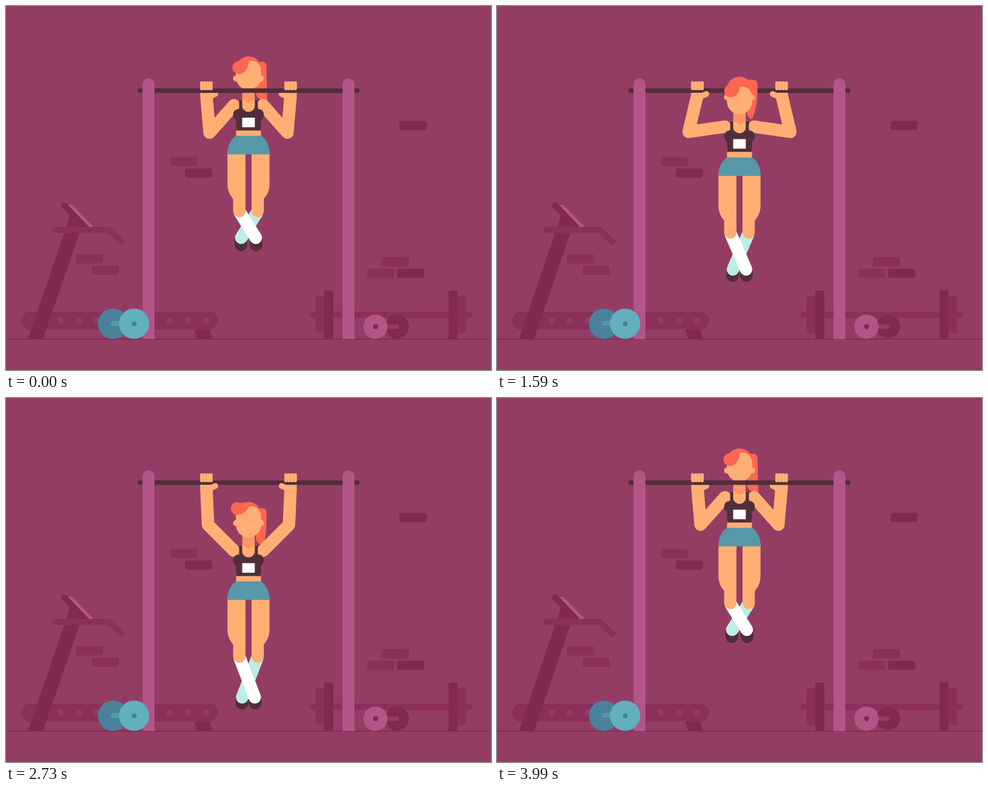
An HTML page with a canvas that plays this animation: 800x600 px, repeating every 4.02 s.

```html
<!DOCTYPE html>
<html lang="en">
<head>
<meta charset="utf-8">
<title>Pull-ups</title>
<style>
html, body { margin: 0; width: 100%; height: 100%; overflow: hidden; background: #933d64; }
canvas { display: block; width: 800px; height: 600px; }
</style>
</head>
<body>
<canvas id="stage" width="800" height="600"></canvas>
<script>
const ctx = document.getElementById('stage').getContext('2d');
const LOOP = 4020;
const C = {
  wall: '#933d64', mid: '#8b3058', dark: '#812950', pink: '#b45587',
  iron: '#502e3a', skin: '#ffaf73', shade: '#ff9566', hair: '#fd6750',
  shorts: '#5798a8', sock: '#ffffff', sockBack: '#bdede7',
  blue: '#4a819c', teal: '#62afbe'
};

// ---------- helpers ----------
function rect(x, y, w, h, color, r = 0) {
  ctx.fillStyle = color;
  ctx.beginPath();
  ctx.roundRect(x, y, w, h, r);
  ctx.fill();
}
function disc(x, y, r, color) {
  ctx.fillStyle = color;
  ctx.beginPath();
  ctx.arc(x, y, r, 0, Math.PI * 2);
  ctx.fill();
}
function line(points, width, color, cap = 'round') {
  ctx.strokeStyle = color;
  ctx.lineWidth = width;
  ctx.lineCap = cap;
  ctx.lineJoin = 'round';
  ctx.beginPath();
  points.forEach(([x, y]) => ctx.lineTo(x, y));
  ctx.stroke();
}
function shape(d, color) {
  ctx.fillStyle = color;
  ctx.fill(new Path2D(d));
}
function mirrored(draw) {
  draw();
  ctx.save();
  ctx.translate(800, 0);
  ctx.scale(-1, 1);
  draw();
  ctx.restore();
}
const mix = (a, b, k) => a + (b - a) * k;
function ease(t, from, to) {
  const k = Math.min(1, Math.max(0, (t - from) / (to - from)));
  return k * k * (3 - 2 * k);
}
function bump(t, from, to) {
  return t > from && t < to ? Math.sin(Math.PI * (t - from) / (to - from)) : 0;
}
// Eased track through [time, value] keys
function track(t, keys) {
  let v = keys[0][1];
  for (let i = 1; i < keys.length; i++) {
    v += (keys[i][1] - keys[i - 1][1]) * ease(t, keys[i - 1][0], keys[i][0]);
  }
  return v;
}

// ---------- motion ----------
const DROP = [[0, 0], [900, 96], [1112, 96], [1832, 14], [2002, 14], [2902, 96], [3098, 96], [3815, 0]];
const STRETCH = [[430, 0], [850, 1], [1300, 1], [1950, 0], [2432, 0], [2852, 1], [3150, 1], [3680, 0]];
const TAIL = [[0, 431], [510, 428], [800, 428], [1140, 421], [1620, 421], [2000, 431], [2070, 431],
  [2730, 426], [3100, 421], [3510, 421], [3900, 431]];

const UP =    { chin: 138,   ear: 119.5, top: 83, brow: 90,   fx: 384,   fy: 101.5, tail: 92,   end: 155 };
const LEVEL = { chin: 141.5, ear: 118,   top: 83, brow: 90.5, fx: 381.5, fy: 94,    tail: 93.5, end: 154.5 };
const DOWN =  { chin: 143,   ear: 115,   top: 81, brow: 98,   fx: 385.5, fy: 105,   tail: 86,   end: 151 };

function headPose(t) {
  const up = 1 - ease(t, 0, 400) + ease(t, 3550, 3820);
  const down = ease(t, 1200, 1650) - ease(t, 2070, 2300);
  const lift = 4.5 * bump(t, 1640, 2070) + 5 * bump(t, 3620, 3990);
  const p = {};
  for (const k in UP) {
    p[k] = LEVEL[k] + (UP[k] - LEVEL[k]) * up + (DOWN[k] - LEVEL[k]) * down;
    if (k !== 'fx') p[k] -= lift;
  }
  p.top += 1.5 * bump(t, 300, 760);
  p.tip = track(t, TAIL);
  return p;
}

// ---------- room ----------
function bricks() {
  [[649, 189.5, 1], [271, 248.5, 0], [295, 267.8, 1], [115.5, 409, 0], [141, 428, 0],
   [620, 414, 0], [595.5, 433, 0], [645, 433, 1]]
    .forEach(([x, y, d]) => rect(x, y, 44.8, 15.3, d ? C.dark : C.mid, 4));
}
function treadmill() {
  shape('M310 532H335L340 549H315Z', C.dark);
  rect(25, 504, 325, 29.2, C.mid, 14.6);
  [90, 120, 150, 270, 300, 330].forEach(x => disc(x, 518.6, 5.4, C.wall));
  shape('M99.5 364H124.5L61 549H36Z', C.dark);
  line([[96, 329], [131, 364]], 10, C.dark, 'round');
  shape('M107 339L137 364H100Z', C.dark);
  rect(120, 364, 22, 8, C.wall);
  shape('M99.5 364H124.5L121 374H96Z', C.dark);
  shape('M103 328H109.5L144.5 364H137Z', C.pink);
  line([[81, 369], [170, 369], [190.5, 389]], 10, C.mid);
}
function barbell() {
  line([[505.5, 509], [764.5, 509]], 10, C.mid);
  rect(510.5, 478, 15, 61, C.mid);
  rect(744, 478, 15, 61, C.mid);
  rect(525, 469, 15, 80, C.dark);
  rect(730, 469, 14.5, 80, C.dark);
}
function dumbbells() {
  disc(645, 528.5, 19.7, C.dark);
  line([[625, 528.5], [644.5, 528.5]], 7.5, C.wall);
  disc(609.5, 528.5, 20, C.pink);
  disc(609.5, 528.5, 4.2, C.dark);
  disc(176.5, 523.7, 25, C.blue);
  line([[177, 523.3], [195, 523.3]], 8, C.shorts);
  disc(211.3, 523.7, 25, C.teal);
  disc(211.3, 523.7, 4.2, C.blue);
}
function room() {
  rect(0, 0, 800, 600, C.wall);
  bricks();
  treadmill();
  barbell();
  rect(0, 548.5, 800, 1, '#772348');
}
function posts() {
  mirrored(() => rect(225.3, 119, 19.6, 430, C.pink, [9.8, 9.8, 0, 0]));
}
function bar() {
  line([[220.5, 139.5], [579.5, 139.5]], 7.6, C.iron);
}

// ---------- athlete ----------
function arms(drop) {
  const hx = 330.5, hy = 145, sx = 376, sy = 163.5 + drop;
  const fore = 64, upper = 60.5;
  const dx = sx - hx, dy = sy - hy, dist = Math.hypot(dx, dy);
  const along = (fore * fore - upper * upper + dist * dist) / (2 * dist);
  const out = Math.sqrt(Math.max(0, fore * fore - along * along));
  const ex = hx + (dx * along - dy * out) / dist;
  const ey = hy + (dy * along + dx * out) / dist;
  mirrored(() => {
    rect(320.2, 143, 20.6, 13, C.skin, [0, 0, 10.3, 10.3]);
    line([[hx, hy + 2], [ex, ey], [sx, sy]], 20.6, C.skin, 'butt');
    disc(sx, sy, 10.3, C.skin);
    line([[337, 148.7], [345.3, 145]], 9.5, C.skin);
  });
}
function fists() {
  mirrored(() => {
    rect(320.2, 125.5, 20.8, 12, C.skin, 4);
    for (let i = 0; i < 4; i++) rect(320.2 + i * 5.1, 124, 5.5, 15, C.skin, 2.7);
  });
}
function legs(k) {
  const foot = 382 + 29 * k, fx = 412 - 2 * k;
  const heel = 393.4 + 26.5 * k, hx = 412.5 - 2 * k;
  const shoe = x => line([[x, heel - 8 + 4 * k], [x, heel]], 21, C.iron);
  const sock = (from, to, color) => {
    line([[from, 339], [to, foot]], 20.5, color, 'butt');
    disc(to, foot, 10.25, color);
  };
  shoe(800 - hx);
  shoe(hx);
  sock(415, 800 - fx, C.sockBack);
  sock(385, fx, C.sock);
  mirrored(() => shape('M365.3 240H395V339A10.2 10.2 0 0 1 374.7 339V318C369 311 365.3 304 365.3 293Z', C.skin));
  shape('M380 213.5H420C429 219 434.8 230 434.8 244.6H365.2C365.2 230 371 219 380 213.5Z', C.shorts);
}
function torso() {
  rect(379.5, 200, 41, 14, C.skin);
  disc(400, 209, 1.1, C.shade);
  rect(385, 154, 30, 24, C.skin);
  mirrored(() => {
    disc(384.3, 179.3, 9.8, C.iron);
    rect(384.6, 154.3, 5, 24, C.iron);
  });
  shape('M379.5 174H389.5V164A10.5 10.5 0 0 0 410.5 164V174H420.5V205.2H379.5Z', C.iron);
  rect(389.6, 184, 20.8, 15.8, C.sock);
}
function tail(p) {
  const { tail: y, end, tip } = p;
  const bend = mix(y + 20, end - 22, (431 - tip) / 10);
  shape(`M404 ${y}H423Q429.5 ${y} 429.8 ${y + 7}C430 ${bend} ${mix(430, tip, 0.4)} ${end - 16} ${tip} ${end}` +
    `L${Math.min(tip, 425)} ${end}Q412 ${end - 2} 412 ${end - 14}L414 ${y + 30}Z`, C.hair);
}
function head(p) {
  shape(`M389.7 ${p.chin - 20}H410.3V154L400 160L389.7 154Z`, C.shade);
  disc(400, p.top + 20.8, 20.8, C.hair);
  disc(379.5, p.ear, 5, C.skin);
  disc(420.5, p.ear, 5, C.skin);
  rect(379.3, p.brow, 41.4, p.chin - p.brow, C.skin, [16, 16, 20.7, 20.7]);
  const { fx, fy, top } = p;
  disc(fx, fy, 10.6, C.hair);
  shape(`M${fx} ${fy + 10.6}C${fx + 9} ${fy + 10.6} 400 ${fy + 2} 400.5 ${p.brow - 0.5}` +
    `L400 ${top + 1}Q388 ${top + 1} 382 ${Math.min(fy - 8, top + 10)}L${fx - 4} ${fy}Z`, C.hair);
}

function draw(t) {
  const drop = track(t, DROP);
  const pose = headPose(t);
  const inFront = t >= 950 && t < 2950;
  const lowered = part => {
    ctx.save();
    ctx.translate(0, drop);
    part();
    ctx.restore();
  };
  room();
  if (inFront) bar();
  lowered(() => tail(pose));
  arms(drop);
  lowered(() => {
    legs(track(t, STRETCH));
    torso();
    head(pose);
  });
  if (!inFront) bar();
  posts();
  fists();
  dumbbells();
}

const start = performance.now();
function tick() {
  draw((performance.now() - start) % LOOP);
  requestAnimationFrame(tick);
}
tick();
</script>
</body>
</html>
```
